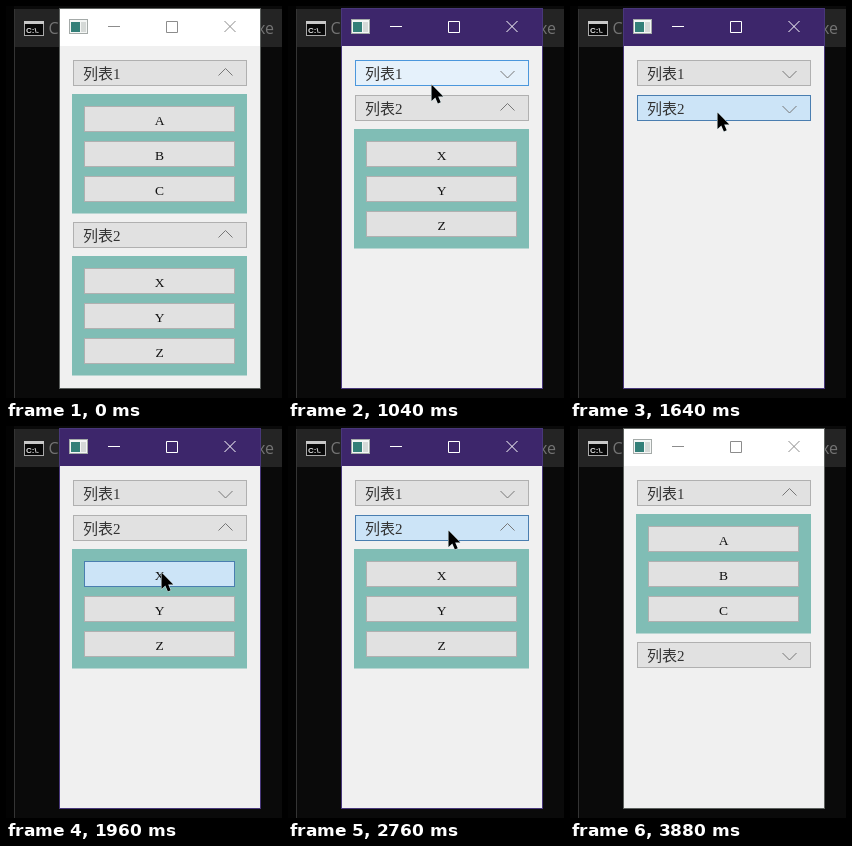
An HTML page for the animation above (3920 ms loop, 276 by 392 pixels).

```html
<!DOCTYPE html>
<html lang="zh">
<head>
<meta charset="utf-8">
<title>折叠列表</title>
<style>
  html, body { margin: 0; width: 100%; height: 100%; overflow: hidden; background: #0a0a0a; }
  svg { display: block; }
  .line { fill: none; stroke-width: 1; }
  .label { font: 300 15px "Liberation Serif", "Noto Sans CJK SC", "Noto Sans CJK", serif; fill: #333; }
  .item { font-size: 13.5px; text-anchor: middle; fill: #111; }
  .console { font: 16px "Open Sans", "Noto Sans", sans-serif; fill: #747474; }
  .button { fill: #e1e1e1; stroke: #b0b0b0; }
  .button.hover { fill: #e5f1fb; stroke: #4b97dc; }
  .button.press { fill: #cce4f7; stroke: #4a7eb0; }
  #bar { fill: #fff; }
  #frame { stroke: #5c605e; }
  #controls { stroke: #8c8c8c; }
  .active #bar { fill: #3d266b; }
  .active #frame { stroke: #48377a; }
  .active #controls { stroke: #fff; }
</style>
</head>
<body>
<svg id="stage" width="276" height="392" viewBox="0 0 276 392">
  <rect width="276" height="392" fill="#0a0a0a"/>
  <rect width="8" height="392" fill="#030303"/>
  <rect x="8" y="3" width="268" height="38" fill="#242424"/>
  <path class="line" d="M8.5 3V392" stroke="#343434"/>
  <rect x="18.5" y="15.5" width="19" height="14" fill="#080808" stroke="#aaa"/>
  <path d="M18 16.5H38" stroke="#c8c8c8" stroke-width="3"/>
  <text x="20" y="27" font-family="Liberation Sans, sans-serif" font-size="8" font-weight="700" fill="#ddd">C:\.</text>
  <text class="console" x="42.5" y="28">C</text>
  <text class="console" x="268" y="28" text-anchor="end">xe</text>

  <g id="window">
    <rect x="53" y="2" width="202" height="381" fill="#f0f0f0"/>
    <rect id="bar" x="53" y="2" width="202" height="38"/>
    <rect id="frame" class="line" x="53.5" y="2.5" width="201" height="380"/>
    <rect x="63.5" y="13.5" width="18" height="14" fill="#f4f6f5" stroke="#a4aaa8"/>
    <rect x="65" y="16" width="9" height="10" fill="#337f78"/>
    <rect x="75" y="16" width="5" height="10" fill="#d5d9d7"/>
    <path id="controls" class="line" d="M102 20.5H114M160.5 15.5H171.5V26.5H160.5ZM218.5 15L229.5 26M229.5 15L218.5 26"/>
  </g>
  <path id="cursor" d="M0 0V16.5L3.8 13L6.4 19L9.2 17.8L6.7 12H11.8Z"
        fill="#000" stroke="#e4f6fa" stroke-width="1" paint-order="stroke"/>
</svg>
<script>
const LOOP = 3920, STEP = 40;
const stage = document.getElementById("stage");
const windowBox = document.getElementById("window");
const cursor = document.getElementById("cursor");

// time, x, y of the pointer tip
const path = [
  [360, 268, 190], [520, 205, 110], [680, 150, 73], [920, 146, 74],
  [1040, 143, 78], [1240, 146, 104], [1640, 147, 106], [1720, 147, 106],
  [1960, 155, 146], [2040, 156, 147], [2240, 162, 176], [2440, 164, 180],
  [2560, 168, 218], [2640, 168, 218], [2760, 160, 104], [2840, 160, 104],
  [2920, 155, 68], [2960, 155, 68], [3080, 262, 262]
];
const presses = [[840, 920], [1280, 1360], [1600, 1680], [1920, 2000],
  [2240, 2320], [2560, 2640], [2760, 2840], [2920, 2960]];
const toggles = [[920, 2960], [1360, 1680, 2840]];

function add(parent, tag, attrs, text) {
  const node = document.createElementNS("http://www.w3.org/2000/svg", tag);
  for (const key in attrs) node.setAttribute(key, attrs[key]);
  if (text) node.textContent = text;
  return parent.appendChild(node);
}

function addButton(parent, x, y, width) {
  const node = add(parent, "rect", { class: "button", x: x + .5, y: y + .5, width: width - 1, height: 25 });
  return { node, x, y, width };
}

function addList(title, items) {
  const group = add(windowBox, "g", {});
  const header = addButton(group, 67, 0, 174);
  add(group, "text", { class: "label", x: 77, y: 19 }, title);
  const arrow = add(group, "path", { class: "line", stroke: "#777", "stroke-width": 1.2 });
  const panel = add(group, "g", {});
  add(panel, "rect", { x: 66, y: 34, width: 175, height: 119.5, fill: "#80bdb5" });
  const buttons = items.map((name, i) => {
    const button = addButton(panel, 78, 46 + 35 * i, 151);
    add(panel, "text", { class: "label item", x: 153.5, y: 64.5 + 35 * i }, name);
    return button;
  });
  return { group, header, arrow, panel, buttons };
}

const lists = [addList("列表1", ["A", "B", "C"]), addList("列表2", ["X", "Y", "Z"])];

function pointerAt(t) {
  const i = path.findIndex(key => key[0] >= t);
  if (t < path[0][0] || i < 0) return null;
  const b = path[i], a = path[Math.max(0, i - 1)];
  const k = b === a ? 0 : (t - a[0]) / (b[0] - a[0]);
  return { x: a[1] + (b[1] - a[1]) * k, y: a[2] + (b[2] - a[2]) * k };
}

function paintButton(button, top, pointer, pressed) {
  const over = pointer && pointer.x >= button.x && pointer.x < button.x + button.width &&
    pointer.y >= top + button.y && pointer.y < top + button.y + 26;
  button.node.setAttribute("class", "button" + (over ? pressed ? " press" : " hover" : ""));
}

function render(t) {
  const pointer = pointerAt(t);
  const pressed = presses.some(([from, to]) => t >= from && t < to);
  let top = 54;
  lists.forEach((list, i) => {
    const open = toggles[i].filter(time => t >= time).length % 2 === 0;
    list.group.setAttribute("transform", `translate(0 ${top})`);
    list.panel.style.display = open ? "" : "none";
    list.arrow.setAttribute("d", open ? "M212.5 15.5L219.5 8.5L226.5 15.5" : "M212.5 11L219.5 18L226.5 11");
    paintButton(list.header, top, pointer, pressed);
    list.buttons.forEach(button => paintButton(button, top, open && pointer, pressed));
    top += open ? 162 : 35;
  });
  stage.classList.toggle("active", t >= 840 && t < 3880);
  cursor.style.display = pointer ? "" : "none";
  if (pointer) cursor.setAttribute("transform", `translate(${pointer.x + .5} ${pointer.y + .5})`);
}

const start = performance.now();
function tick() {
  const t = (performance.now() - start) % LOOP;
  render(Math.floor(t / STEP) * STEP);
  requestAnimationFrame(tick);
}
tick();
</script>
</body>
</html>
```
